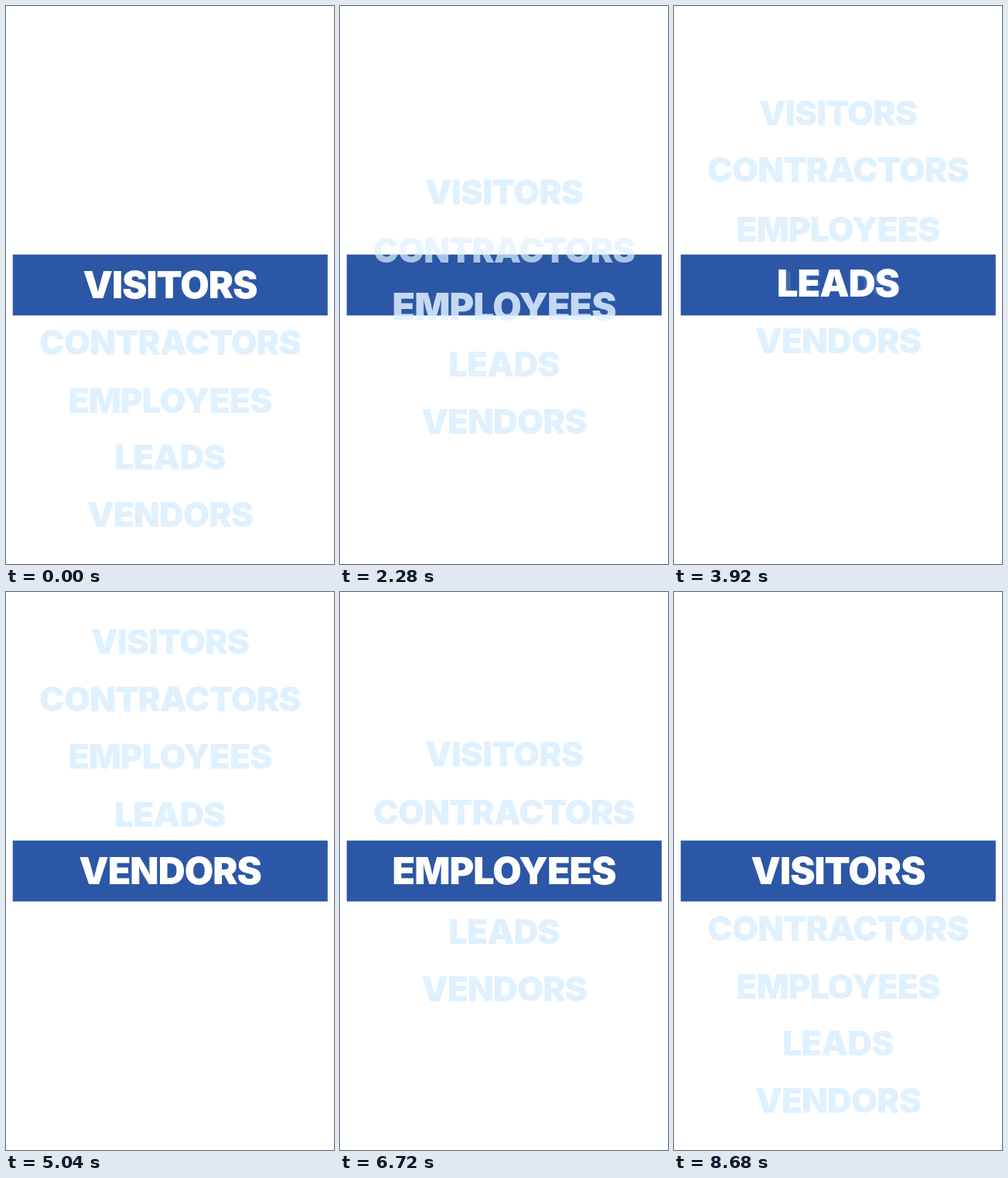
An HTML page with a canvas for the animation above (8720 ms loop, 424 px wide and 720 px high).

```html
<!DOCTYPE html>
<html lang="en">
<head>
<meta charset="utf-8">
<title>Word wheel</title>
<style>
  html, body { margin: 0; width: 100%; height: 100%; overflow: hidden; background: #fff; }
  canvas { display: block; width: 424px; height: 720px; }
</style>
</head>
<body>
<canvas id="stage"></canvas>
<script>
const W = 424, H = 720, LOOP = 8720, MOVE = 600;
const BLUE = '#2c57a6', PALE = [223, 241, 255], WHITE = [255, 255, 255];
const SMALL = 44, LARGE = 48.4, CAP = 0.727;
const words = ['VISITORS', 'CONTRACTORS', 'EMPLOYEES', 'LEADS', 'VENDORS'];

// Resting centre of each word, with the selected index and the start of the move into it.
const first = { pick: 0, y: [359, 434, 509, 582.5, 656] };
const stops = [
  { ...first, at: 0 },
  { pick: 1, at: 1040, y: [285.5, 359, 433, 507, 580.5], delay: 270 },
  { pick: 2, at: 2040, y: [211.5, 288, 359, 434.5, 508.5] },
  { pick: 3, at: 3000, y: [138.5, 212, 289, 358.5, 432.5] },
  { pick: 4, at: 3880, y: [64.5, 138, 212, 287, 359] },
  { pick: 3, at: 5120, y: [136, 210, 284.5, 359.5, 438] },
  { pick: 2, at: 6040, y: [209.5, 284, 359.5, 438, 512.5] },
  { pick: 1, at: 6960, y: [287, 359.5, 438, 513, 587] },
  { ...first, at: 7880 }
];

const canvas = document.getElementById('stage');
const ctx = canvas.getContext('2d');
const ratio = window.devicePixelRatio || 1;
canvas.width = W * ratio;
canvas.height = H * ratio;
ctx.scale(ratio, ratio);

const clamp = v => Math.max(0, Math.min(1, v));
const ramp = (t, from, to) => clamp((t - from) / (to - from));
const mix = (a, b, k) => a.map((v, i) => v + (b[i] - v) * k);

// Cubic Bezier (0.4, 0, 0.2, 1), solved by bisection.
function ease(x) {
  if (x <= 0 || x >= 1) return clamp(x);
  const curve = (u, a, b) => 3 * (1 - u) * u * ((1 - u) * a + u * b) + u ** 3;
  let lo = 0, hi = 1;
  for (let i = 0; i < 24; i++) {
    const mid = (lo + hi) / 2;
    if (curve(mid, 0.4, 0.2) < x) lo = mid; else hi = mid;
  }
  return curve(lo, 0, 1);
}

function drawWord(text, y, size, color, alpha) {
  if (alpha <= 0) return;
  ctx.globalAlpha = alpha;
  ctx.fillStyle = `rgb(${color.map(Math.round)})`;
  ctx.font = `900 ${size}px Inter, sans-serif`;
  ctx.letterSpacing = `${-0.02 * size}px`;
  ctx.fillText(text, 212, y + size * CAP / 2);
}

function draw(time) {
  let n = stops.length - 1;
  while (n > 0 && time < stops[n].at) n--;
  const to = stops[n], from = stops[Math.max(0, n - 1)];
  const age = n ? time - to.at : MOVE;
  const p = ease(age / MOVE);

  ctx.globalAlpha = 1;
  ctx.fillStyle = '#fff';
  ctx.fillRect(0, 0, W, H);
  ctx.fillStyle = BLUE;
  ctx.fillRect(8.7, 320.7, 407.1, 78.6);
  ctx.textAlign = 'center';
  ctx.textBaseline = 'alphabetic';

  words.forEach((word, i) => {
    const y = from.y[i] + (to.y[i] - from.y[i]) * p;
    let small = 1, large = 0, color = WHITE;
    if (i === to.pick) {
      // The word swaps to its large form, which then brightens to white.
      const delay = to.delay || 140;
      large = ramp(age, delay, delay + 120);
      small = 1 - 2 * large;
      color = mix(PALE, WHITE, ramp(age, 250, MOVE));
    } else if (i === from.pick) {
      large = 1 - ramp(age, 60, 200);
      small = ramp(age, 0, 340);
    }
    drawWord(word, y, SMALL, PALE, small);
    drawWord(word, y, LARGE, color, large);
  });
}

const start = performance.now();
function tick() {
  draw((performance.now() - start) % LOOP);
  requestAnimationFrame(tick);
}
tick();
</script>
</body>
</html>
```
